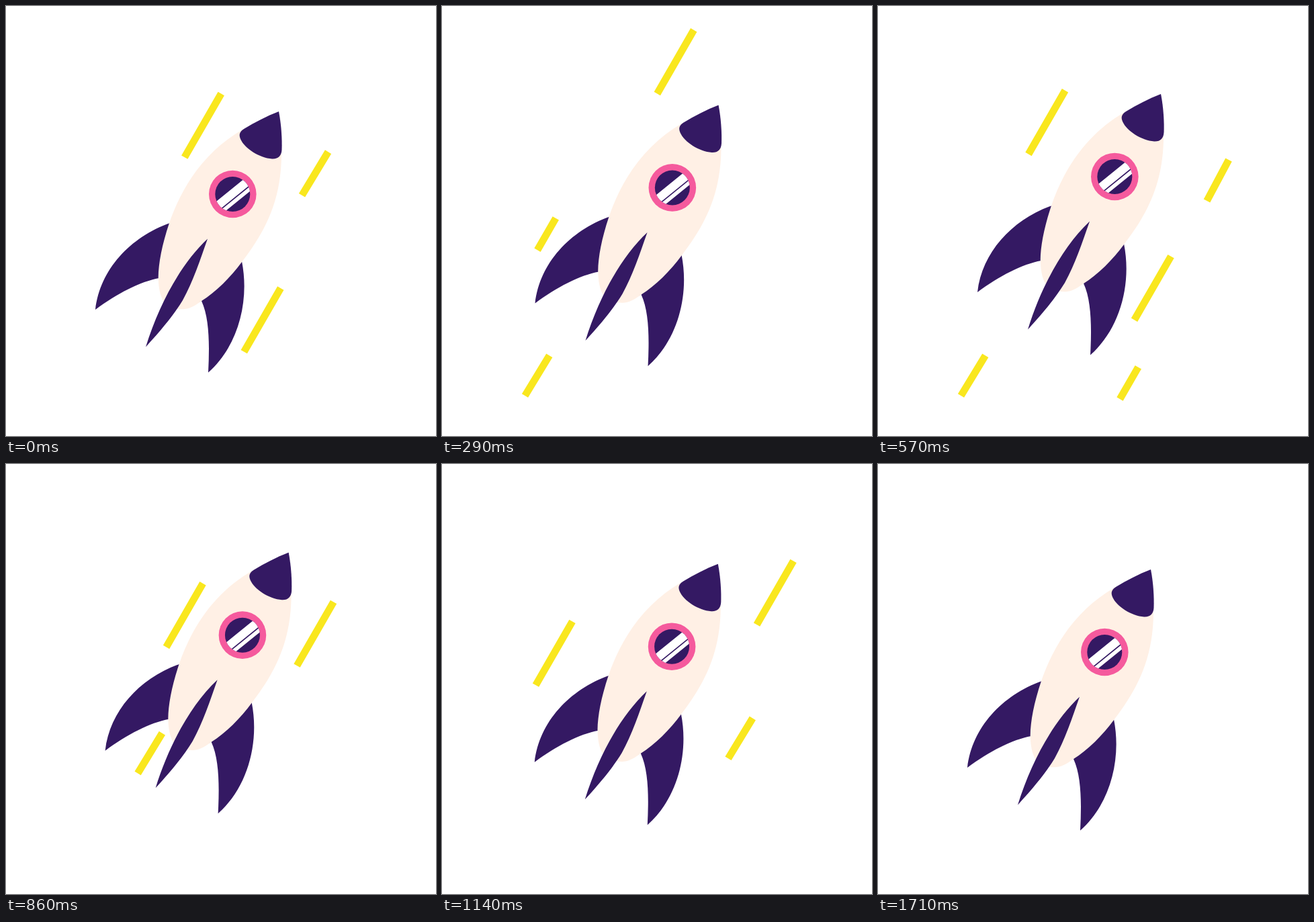
An HTML page that plays this animation: 640 by 640 pixels, repeating every 1.93 s.

```html
<!DOCTYPE html>
<html lang="en">
<head>
<meta charset="utf-8">
<title>Rocket</title>
<style>
  html, body { margin: 0; width: 100%; height: 100%; overflow: hidden; background: #fff; }
  svg { display: block; width: 100vw; height: 100vh; }
</style>
</head>
<body>
<svg viewBox="0 0 640 640">
  <defs>
    <clipPath id="pane"><circle r="26"/></clipPath>
  </defs>
  <path id="streaks" fill="none" stroke="#f9e71e" stroke-width="10.8"/>
  <g id="rocket" fill="#341963">
    <path d="M244 323C185 344 140 392 133 452C165 428 200 410 228 405L260 380Z"/>
    <path d="M351 380C363 440 345 507 301 545.5C303 505 303 465 291 439L310 400Z"/>
    <path fill="#fff0e5" d="M352 184C300 214 264 262 243 323C232 356 227 383 226.700 404C227 424 231 436 237 443C247 450 258 452 266 451C276 450 284 444 291 439C312 426 335 403 351 381C385 337 410 290 410 220Z"/>
    <path d="M406 157C410 178 411 198 410.500 214C410 223 405 228 396 227.500C377 226 355 212 349 198C346 191 348 187 354 183C370 173 388 164 406 157Z"/>
    <path d="M300 346.500C261 383 228 443 208 507.500C235 478 250 459 263 438C278 411 289 378 300 346.500Z"/>
    <g transform="translate(337.300 280)">
      <circle r="35.300" fill="#f55a9d"/>
      <circle r="26"/>
      <g clip-path="url(#pane)">
        <path transform="rotate(-39)" fill="#fff" d="M-30 -6.800H30V5.600H-30ZM-30 7.300H30V12.900H-30Z"/>
      </g>
    </g>
  </g>
</svg>
<script>
const LOOP = 1930, FPS = 14, LAST = 24;
const RISE = 704, LIFT = 32.4;

const LONG = [54.5, -94.7, 0.5];   // length vector, step per frame in lengths
const MID = [36.3, -59.8, 1];
const WIDE = [39, -64.7, 1];
const STEEP = [32.5, -61, 1];
const SHORT = [27.3, -47.4, 1];

// kind, lower end in the final frame of a burst, first frames of its bursts
const streaks = [
  [LONG, 238.5, 272.5, [-2, 4, 9, 20]],
  [LONG, 327, 562, [-2, 7, 20]],
  [WIDE, 401.5, 346.5, [-2, 19]],
  [SHORT, 142, 363.3, [1]],
  [MID, 123.5, 580, [1, 5, 11]],
  [SHORT, 360, 585, [5]],
  [LONG, 169.5, 315.2, [7]],
  [STEEP, 392, 473, [8]],
  [LONG, 378.5, 394.8, [11]],
  [LONG, 414, 333.8, [15]],
  [LONG, 85, 423.8, [15]],
  [MID, 353.4, 557.8, [15]]
];
const BURST = 4;

const rocketEl = document.getElementById('rocket');
const streaksEl = document.getElementById('streaks');

// Ease in and out along cubic-bezier(.42, 0, .58, 1)
function ease(x) {
  if (x <= 0) return 0;
  if (x >= 1) return 1;
  let lo = 0, hi = 1;
  for (let i = 0; i < 24; i++) {
    const s = (lo + hi) / 2, r = 1 - s;
    if (1.26 * r * r * s + 1.74 * r * s * s + s * s * s < x) lo = s;
    else hi = s;
  }
  return lo * lo * (3 - 2 * lo);
}

const startOf = i => Math.round(i * 100 / FPS) * 10;

function frameAt(ms) {
  let i = LAST;
  while (i > 0 && startOf(i) > ms) i--;
  return i;
}

function streakPath(frame) {
  let d = '';
  for (const [[dx, dy, step], x, y, starts] of streaks) {
    for (const start of starts) {
      const age = frame - start;
      if (age < 0 || age >= BURST) continue;
      const k = (BURST - 1 - age) * step;
      d += `M${x + dx * k} ${y + dy * k}l${dx} ${dy}`;
    }
  }
  return d;
}

function draw(ms) {
  const frame = frameAt(ms % LOOP);
  const t = frame * 1000 / FPS;
  const lift = LIFT * ease(1 - Math.abs(t - RISE) / RISE);
  rocketEl.setAttribute('transform', `translate(${lift * 0.5} ${-lift * 0.866})`);
  streaksEl.setAttribute('d', streakPath(frame));
}

const begin = performance.now();
function tick() {
  draw(performance.now() - begin);
  requestAnimationFrame(tick);
}
tick();
</script>
</body>
</html>
```
